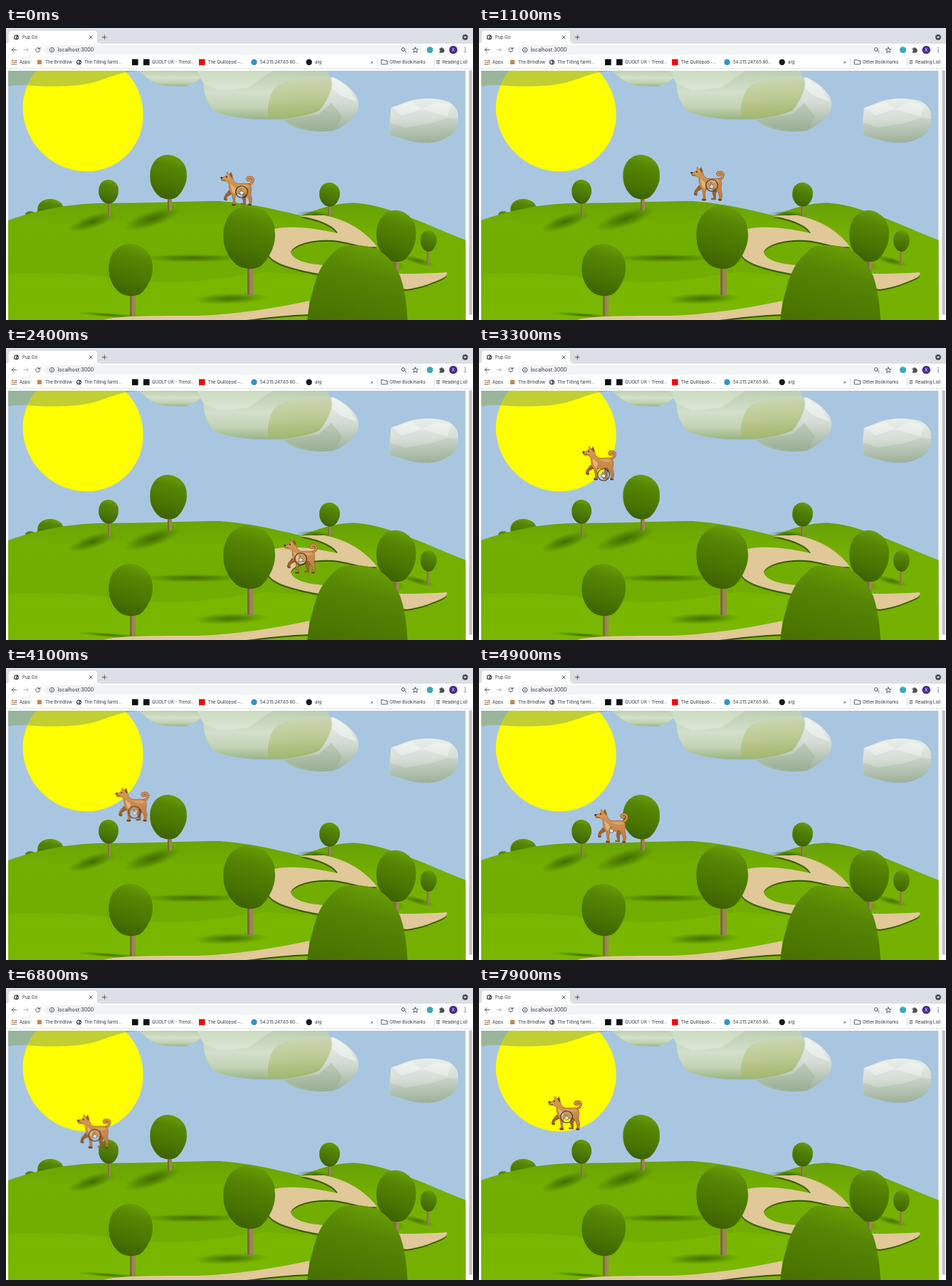
Animation of 656 by 410 pixels, one loop 8000 ms. Source, as an HTML page:

```html
<!DOCTYPE html>
<html lang="en">
<head>
<meta charset="utf-8">
<title>Pup Go</title>
<style>
  html, body { margin: 0; width: 100%; height: 100%; overflow: hidden; background: #fff; }
  svg { display: block; width: 100%; height: 100%; }
  text { font-family: Inter, "Liberation Sans", sans-serif; font-size: 6.1px; fill: #303338; }
  .icon { fill: none; stroke: #55585d; stroke-width: 1; stroke-linecap: round; stroke-linejoin: round; }
  .skin { fill: url(#fur); stroke: #85502a; stroke-width: .55; stroke-linejoin: round; }

  #dog { animation: walk 8s infinite; }
  #cursor { animation: point 8s infinite; }
  #ring { animation: press 8s step-end infinite; }

  @keyframes walk {
    0%     { transform: translate(301px, 202px); animation-timing-function: steps(11); }
    13.75% { transform: translate(297px, 195px); animation-timing-function: steps(13); }
    30%    { transform: translate(390px, 269px); animation-timing-function: steps(9); }
    41.25% { transform: translate(145px, 138px); animation-timing-function: steps(16); }
    61.25% { transform: translate(162px, 198px); animation-timing-function: steps(9); }
    72.5%  { transform: translate(102px, 201px); animation-timing-function: steps(21); }
    98.75%, 100% { transform: translate(97px, 152px); }
  }
  @keyframes point {
    0%     { transform: translate(331px, 230px); animation-timing-function: steps(11); }
    13.75% { transform: translate(327px, 221px); animation-timing-function: steps(13); }
    30%    { transform: translate(414px, 296px); animation-timing-function: steps(9); }
    41.25% { transform: translate(175px, 178px); animation-timing-function: steps(16); }
    61.25% { transform: translate(186px, 227px); animation-timing-function: steps(9); }
    72.5%  { transform: translate(126px, 230px); animation-timing-function: steps(21); }
    98.75%, 100% { transform: translate(123px, 181px); }
  }
  @keyframes press { 0% { opacity: 1 } 57.5% { opacity: 0 } 63.75%, 100% { opacity: 1 } }
</style>
</head>
<body>
<svg viewBox="0 0 656 410" preserveAspectRatio="none">
  <defs>
    <clipPath id="page"><path d="M3 60H645.400V410H3z"/></clipPath>
    <linearGradient id="hill" x1="0" y1="243" x2="0" y2="410" gradientUnits="userSpaceOnUse">
      <stop offset="0" stop-color="#68a304"/><stop offset=".2" stop-color="#73ae02"/>
      <stop offset=".6" stop-color="#71ad01"/><stop offset="1" stop-color="#78b500"/>
    </linearGradient>
    <linearGradient id="far" x1="0" y1="245" x2="0" y2="350" gradientUnits="userSpaceOnUse">
      <stop offset="0" stop-color="#65a104"/><stop offset=".4" stop-color="#74af01"/><stop offset="1" stop-color="#77b300"/>
    </linearGradient>
    <linearGradient id="crown" x1=".65" y1="0" x2=".4" y2="1">
      <stop offset="0" stop-color="#6a9f06"/><stop offset=".25" stop-color="#568604"/>
      <stop offset=".7" stop-color="#487301"/><stop offset="1" stop-color="#3c6100"/>
    </linearGradient>
    <linearGradient id="puff" x1="0" y1="0" x2="0" y2="1">
      <stop offset="0" stop-color="#bdd0b2"/><stop offset=".45" stop-color="#d3e0cb"/>
      <stop offset=".75" stop-color="#c1d2b3"/><stop offset="1" stop-color="#99b483"/>
    </linearGradient>
    <linearGradient id="white" x1=".45" y1="0" x2=".5" y2="1">
      <stop offset="0" stop-color="#e9eeea"/><stop offset=".5" stop-color="#d3dcd4"/><stop offset="1" stop-color="#9db096"/>
    </linearGradient>
    <linearGradient id="overlap" x1=".4" y1="0" x2=".5" y2="1">
      <stop offset="0" stop-color="#c9d5b3"/><stop offset=".5" stop-color="#bccb93"/><stop offset="1" stop-color="#9fb56c"/>
    </linearGradient>
    <linearGradient id="fur" x1="0" y1="0" x2="0" y2="1">
      <stop offset="0" stop-color="#dc9d58"/><stop offset="1" stop-color="#b97a40"/>
    </linearGradient>
    <radialGradient id="shade">
      <stop offset="0" stop-color="#264a00" stop-opacity=".65"/><stop offset=".5" stop-color="#2e5600" stop-opacity=".38"/>
      <stop offset="1" stop-color="#3c6a00" stop-opacity="0"/>
    </radialGradient>
    <path id="leaf" d="M48 0C66 0 82 8 92 20C100 30 102 48 98 60C92 77 82 88 72 95C60 101 40 100 28 94C14 86 2 70 1 54C-1 38 3 26 12 15C22 5 36 0 48 0z"/>
    <path id="bush" d="M36 1C45-1 60 0 68 3C80 8 88 18 93 28C98 40 101 60 101 80V105H0C-1 75 0 60 6 42C10 27 14 19 23 10C28 6 31 2 36 1z"/>
    <g id="globe">
      <circle r="3.600" fill="#444"/>
      <path d="M-2.600-.8L-.8-2.300L.6-1.200L-.6 0L.2 1.200L-1 2.400zM1-.4L2.800-.2L1.600 2z" fill="#fff"/>
    </g>
    <path id="folder" class="icon" d="M0 1h3l1 1.200h4v5H0z" stroke-width=".8"/>
  </defs>

  <!-- browser window -->
  <rect width="656" height="410" fill="#fff"/>
  <rect width="656" height="22" fill="#dcdee6"/>
  <path d="M0 21.500Q4 21.500 4 18V8Q4 4 8 4H124Q128 4 128 8V18Q128 21.500 132 21.500V22H0z" fill="#fff"/>
  <use href="#globe" x="14.500" y="13"/>
  <text x="23" y="15.200">Pup Go</text>
  <path class="icon" d="M117 11l4 4m0-4l-4 4M135.500 13h5.600m-2.800-2.800v5.600"/>
  <circle cx="645" cy="13" r="3.900" fill="#4b4e53"/>
  <path d="M643 12h4l-2 2.500z" fill="#fff"/>

  <rect x="54" y="24" width="531" height="13.500" rx="6.750" fill="#f2f3f5"/>
  <path class="icon" d="M14.500 30.700H8.300m2.700-2.700l-2.700 2.700l2.700 2.700"/>
  <path class="icon" style="stroke:#b4b6ba" d="M25 30.700h6.200m-2.700-2.700l2.700 2.700l-2.700 2.700"/>
  <path class="icon" d="M47 28.600a3 3 0 1 0 .8 2.700M47.900 27.300v2.300h-2.300"/>
  <circle class="icon" cx="64.500" cy="30.700" r="3.200"/>
  <path class="icon" d="M64.500 30.500v1.700M64.500 29v.1"/>
  <text x="72.500" y="33.200" style="font-size:7.200px">localhost:3000</text>
  <circle class="icon" cx="558" cy="30" r="2.400"/>
  <path class="icon" d="M560 32l2.200 2.200M575 27.200l1.100 2.400l2.600.3l-1.900 1.800l.5 2.600l-2.300-1.300l-2.300 1.300l.5-2.600l-1.900-1.800l2.600-.3z"/>
  <circle cx="595.500" cy="30.700" r="4.500" fill="#35a9b9"/>
  <path d="M608.800 28.500h1.700a1.300 1.300 0 0 1 2.600 0h1.800v2a1.300 1.300 0 0 1 0 2.600v1.700h-6.100v-2a1.200 1.200 0 0 0 0-2.400z" fill="#4c4f54"/>
  <circle cx="628.300" cy="30.700" r="5.800" fill="#4a2a91"/>
  <text x="628.300" y="32.800" text-anchor="middle" style="fill:#fff;font-size:5.800px">X</text>
  <g fill="#4c4f54"><circle cx="645" cy="28" r=".8"/><circle cx="645" cy="30.700" r=".8"/><circle cx="645" cy="33.400" r=".8"/></g>

  <g id="apps"></g>
  <rect x="44" y="45" width="6" height="6" fill="#c4864f"/>
  <use href="#globe" x="102.500" y="48"/>
  <rect x="177" y="43.700" width="8.600" height="8.600" fill="#111"/>
  <rect x="193" y="43.700" width="8.600" height="8.600" fill="#111"/>
  <rect x="271" y="43.700" width="8.600" height="8.600" fill="#e3120b"/>
  <circle cx="348.500" cy="48" r="4.200" fill="#2d94cd"/>
  <circle cx="425.700" cy="48" r="4.200" fill="#181a1d"/>
  <g id="labels"></g>
  <use href="#folder" x="527.500" y="43.700"/>
  <path d="M521.500 43v10M601.500 43v10" stroke="#c9cbd0" stroke-width=".7"/>
  <path class="icon" d="M605 45.500h4M605 47.700h4M605 49.900h4"/>
  <path d="M0 56.700H656" stroke="#dfe0e4"/>
  <path d="M649 57V410" stroke="#ececec" stroke-width=".8"/>
  <rect x="650.500" y="59" width="4.300" height="344" rx="2.100" fill="#bfc0c2"/>

  <!-- landscape -->
  <g clip-path="url(#page)">
    <rect x="3" y="60" width="643" height="350" fill="#a9c6e1"/>
    <ellipse rx="87" ry="82" transform="translate(108.200 116.800) rotate(45)" fill="#ff0"/>

    <!-- clouds -->
    <path d="M3 60H187C172 61 158 64 145 69C130 75 112 80 92 81C68 83 45 82 26 80Q12 80 3 82z" fill="#8ea860" opacity=".55"/>
    <path d="M186 60L196 68Q207 78 222 81L250 82Q268 78 279 65V60z" fill="url(#puff)"/>
    <path d="M386 126Q394 136 411 141Q434 148 461 144Q484 133 492 119Q498 109 493 97Q483 80 460 69L400 85z" fill="url(#white)"/>
    <path d="M460 70L480 83L492 103L470 95L458 84z" fill="#fff" opacity=".4"/>
    <path d="M390 129L440 121L457 105L472 124L462 144Q425 148 390 129z" fill="#8ea782" opacity=".3"/>
    <path d="M265 60L277 76Q278 100 292 116Q307 124 338 127Q369 130 398 127Q427 123 440 116Q457 97 458 79Q456 67 450 60z" fill="url(#puff)"/>
    <path d="M277 78L300 88L340 84L374 60H268z" fill="#edf4e9" opacity=".3"/>
    <path d="M368 127Q366 96 380 82Q406 66 457 72Q459 93 440 116Q417 126 368 127z" fill="url(#overlap)"/>
    <path d="M541 112L562 104Q576 99 592 99Q610 99 623 104Q633 111 635 120V137Q629 149 617 155Q604 162 590 161Q574 161 562 157L540 150Q538 130 541 112z" fill="url(#white)"/>
    <path d="M542 112L570 103L584 114L556 123zM584 114L606 104L626 107L620 124z" fill="#fff" opacity=".35"/>
    <path d="M540 133L560 140L596 134L621 126L635 128V137Q629 149 617 155Q604 162 590 161Q574 161 562 157L540 150z" fill="#9cae9a" opacity=".25"/>

    <use href="#leaf" transform="translate(44 240) scale(.37 .32)" fill="url(#crown)"/>
    <use href="#leaf" transform="translate(27 257) scale(.15 .12)" fill="url(#crown)"/>

    <path d="M400 270C435 253 465 246 489 245.500C536 248 594 278 646 298V410H400z" fill="url(#far)"/>
    <path d="M3 270C38 258 76 248 130 246C195 246 255 243 300 243C344 246 384 256 425 266C470 284 510 300 570 345L646 362V410H3z" fill="url(#hill)"/>
    <path d="M521 307C560 315 610 300 646 299V410H510z" fill="#75b001"/>
    <path d="M3 345C70 342 118 346 166 353C260 363 310 350 365 342L440 349V410H3z" fill="#7ab800" opacity=".75"/>
    <g id="shadows" fill="url(#shade)"></g>

    <!-- road: dark rim under a sand surface -->
    <g id="road">
      <path d="M413 264Q428 263 447 263C482 270 505 286 521 307C500 309 482 300 460 298C430 296 403 304 400 315C403 326 422 331 445 333L555 345Q590 345 619 343Q621 346 616 350C600 358 583 364 563 367L440 345C400 338 376 330 369 319L377 282C402 277 432 281 466 288C461 277 438 268 413 264z"/>
      <path d="M138 410C152 404 204 404 270 404C325 402 380 393 426 383V402C394 403 360 407 330 411z"/>
    </g>
    <g id="trees"></g>

    <g id="dog">
      <path d="M38 19C42 17 46 16 46 11C46 7 38 6 38 10Q39 12.500 42 11" fill="none" stroke="#8a5022" stroke-width="3.500" stroke-linecap="round"/>
      <path d="M38 19C42 17 46 16 46 11C46 7 38 6 38 10Q39 12.500 42 11" fill="none" stroke="#cf8f4f" stroke-width="2.400" stroke-linecap="round"/>
      <path d="M32 29L31 37L33 44H29.500V46H35.500L35.500 37L39 31zM12 26L6.500 33L5 38L8 40L9.500 39L9 35L16 31z" fill="#9d612d" stroke="#784822" stroke-width=".5"/>
      <path class="skin" d="M9 5L9.500 0L13 4L15 .6L17 6C18 11 19 14 23 16C30 18 37 14 42 18C45 22 43 28 43 32L44.500 38L43.500 47H39.500V45L41 43L39.500 37L35 30C29 32 25 31 22 31L20.500 38L21.500 47H16.500V45L18.500 43L17 33C13 29 12 22 12 15L8 13L2 12L.8 8L6 7z"/>
      <path d="M14 17C16 24 16 29 20 31L22 24C20 21 17 19 14 17z" fill="#ebc08a" opacity=".75"/>
      <path d="M24 18C30 20 36 17 41 20C39 23 28 23 24 18z" fill="#e9b06e" opacity=".6"/>
      <path d="M13 4L15 .6L17 6L16 9z" fill="#8f5327"/>
      <path d="M2 11l5 .6" stroke="#603719" stroke-width=".6"/>
      <ellipse cx="1.800" cy="8.400" rx="1.400" ry="1.100" fill="#241713"/>
      <circle cx="9" cy="7" r=".9" fill="#24170e"/>
      <path d="M16.500 45.500h5v1.800h-5zM39.500 45.500h4v1.800h-4zM5 37.500l3 2 1.500-.8-.7 1.800-3.300-1.200z" fill="#54311d"/>
    </g>

    <g id="cursor">
      <circle id="ring" r="8.300" fill="#fff" fill-opacity=".12" stroke="#302b28" stroke-width="1.100"/>
      <path d="M-1.500 4L-3 .6Q-3.200-.6-1.700.2V-3.700Q-1-5-.3-3.700V-1L2.500-.2Q3.200 0 2.800 1.800L2 4z" fill="#f6eee3" stroke="#54483e" stroke-width=".7"/>
    </g>
  </g>
</svg>
<script>
  const NS = "http://www.w3.org/2000/svg";
  const byId = id => document.getElementById(id);
  function add(parent, tag, attrs, text = "") {
    const el = document.createElementNS(NS, tag);
    for (const key in attrs) el.setAttribute(key, attrs[key]);
    el.textContent = text;
    return parent.appendChild(el);
  }

  const dots = ["#d9483b", "#e49532", "#438b58"];
  for (let i = 0; i < 9; i++) {
    const row = Math.floor(i / 3);
    add(byId("apps"), "rect", { x: 8 + i % 3 * 2.6, y: 44.8 + row * 2.6, width: 1.7, height: 1.7, fill: dots[(row + i) % 3] });
  }

  const labels = [
    [19, "Apps"], [55, "The Brindlow"], [110, "The Tilting farml..."],
    [205, "QUOLT UK - Trend..."], [283.5, "The Quillopod -..."],
    [357, "54.215.247.65:80..."], [434, "arg"], [512, "»"],
    [539, "Other Bookmarks"], [613, "Reading List"]
  ];
  for (const [x, label] of labels) add(byId("labels"), "text", { x, y: 50.2 }, label);

  // centre, radii and tilt
  const shadows = [
    [121, 272, 36, 10, -18], [205, 268, 44, 12, -18], [262, 323, 72, 6, 0],
    [314, 380, 54, 8, -2], [145, 403, 46, 3, 4], [522, 321, 45, 10, 24],
    [435, 262, 27, 5, 4], [579, 327, 24, 5, 15]
  ];
  for (const [cx, cy, rx, ry, tilt] of shadows)
    add(byId("shadows"), "ellipse", { cx, cy, rx, ry, transform: `rotate(${tilt} ${cx} ${cy})` });

  const road = byId("road");
  for (const path of [...road.children]) {
    path.setAttribute("fill", "#e0c898");
    const rim = path.cloneNode();
    rim.setAttribute("fill", "#3c600a");
    rim.setAttribute("transform", "translate(-.5 2.3)");
    road.insertBefore(rim, road.firstChild);
  }

  // crown box, trunk centre, trunk width, foot, crown shape
  const trees = [
    [130, 213, 28, 34, 145, 3.5, 265], [202, 178, 52, 63, 230, 6, 256],
    [440, 217, 29, 34, 454.5, 4, 264], [582, 284, 23, 30, 593, 3, 333],
    [520, 256, 56, 73, 549, 7, 343], [305, 249, 73, 90, 343.5, 9, 375],
    [144, 303, 62, 74, 178, 8, 404], [423, 305, 140, 150, 493, 16, 480, "bush"]
  ];
  for (const [x, y, w, h, cx, width, foot, shape = "leaf"] of trees) {
    const top = y + h * .9, left = cx - width / 2;
    add(byId("trees"), "rect", { x: left, y: top, width, height: foot - top, fill: "#9c8554" });
    add(byId("trees"), "rect", { x: left, y: top, width: width * .35, height: foot - top, fill: "#796a3d" });
    add(byId("trees"), "use", { href: "#" + shape, transform: `translate(${x} ${y}) scale(${w / 100} ${h / 100})`, fill: "url(#crown)" });
  }
</script>
</body>
</html>
```
